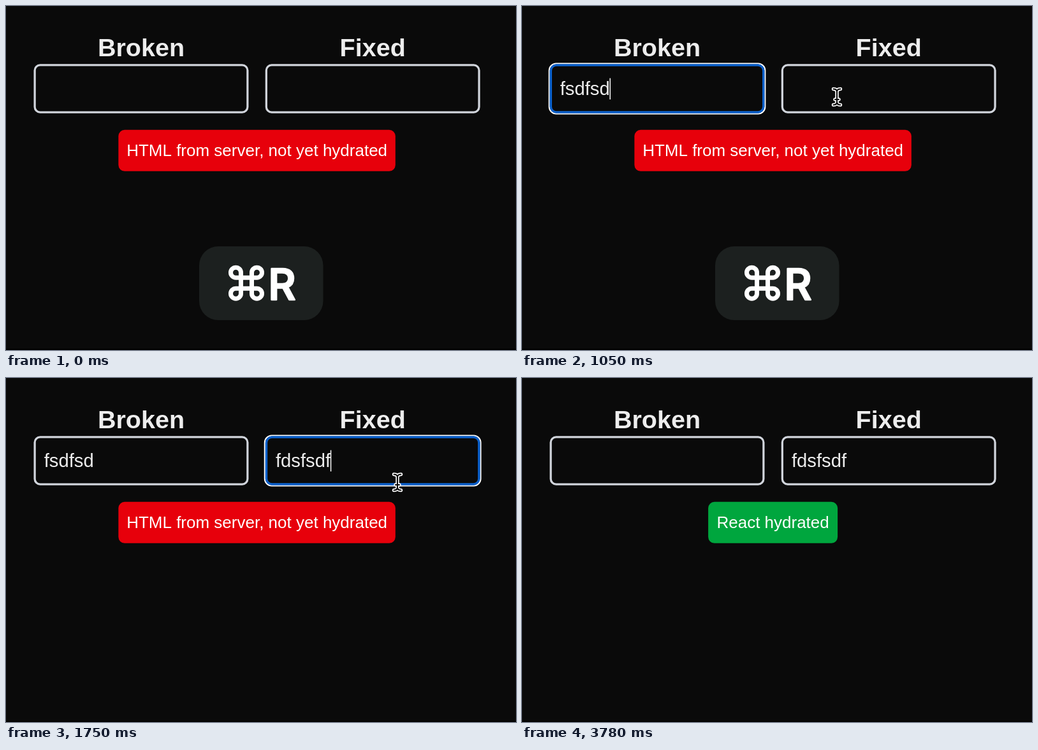
An HTML page with a canvas that plays this animation: 800x541 px, repeating every 3850 ms.

```html
<!DOCTYPE html>
<html lang="en">
<head>
<meta charset="utf-8">
<title>Hydration demo</title>
<style>
html, body { margin: 0; width: 100%; height: 100%; overflow: hidden; background: #0a0a0a; }
canvas { display: block; width: 800px; height: 541px; }
</style>
</head>
<body>
<canvas id="stage" width="800" height="541"></canvas>
<script>
const ctx = document.getElementById('stage').getContext('2d');
const LOOP = 3850, STEP = 70;
const SANS = '"Liberation Sans", Arial, sans-serif';
const HYDRATED = 1960;

// Pointer stops: time, x, y
const PATH = [
  [70, 4, 150], [420, 230, 90], [770, 232, 90], [1050, 494, 143],
  [1260, 497, 141], [1400, 500, 141], [1680, 614, 164],
  [2940, 614, 164], [3360, 604, 575]
];

const FIELDS = [
  { title: 'Broken', x: 43.5, text: 'fsdfsd', keys: [560, 630, 770, 840, 910, 980],
    focus: 350, blur: 1190, clear: HYDRATED },
  { title: 'Fixed', x: 406.7, text: 'fdsfsdf', keys: [1260, 1330, 1400, 1470, 1540, 1610, 1680],
    focus: 1190, blur: 2100, clear: LOOP }
];

const clamp = v => Math.max(0, Math.min(1, v));

function box(x, y, w, h, r) {
  ctx.beginPath();
  ctx.roundRect(x, y, w, h, r);
}

function frame(x, y, w, h, r, line, color) {
  const d = line / 2;
  box(x + d, y + d, w - line, h - line, r - d);
  ctx.lineWidth = line;
  ctx.strokeStyle = color;
  ctx.stroke();
}

function label(text, x, y, font, color, align = 'left') {
  ctx.font = font;
  ctx.textAlign = align;
  ctx.fillStyle = color;
  ctx.fillText(text, x, y);
}

function drawField(f, t) {
  const y = 91.3, w = 337, h = 77.4;
  const focused = t >= f.focus && t < f.blur;
  label(f.title, f.x + w / 2, 79, `bold 39.5px ${SANS}`, '#ededed', 'center');
  if (focused) {
    frame(f.x - 1.9, y - 1.9, w + 3.8, h + 3.8, 12, 2.1, '#fff');
    frame(f.x, y, w, h, 10.5, 3.5, '#0a60cc');
  } else {
    frame(f.x, y, w, h, 10, 3.25, '#d1d5dc');
  }
  const count = t < f.clear ? f.keys.filter(k => t >= k).length : 0;
  const typed = f.text.slice(0, count), left = f.x + 16.2;
  label(typed, left, 140, `29.25px ${SANS}`, '#ededed');
  if (focused) {
    ctx.fillStyle = '#ededed';
    ctx.fillRect(left + ctx.measureText(typed).width - 0.3, 113.5, 1.6, 33.5);
  }
}

function drawBadge(t) {
  const done = t >= HYDRATED;
  const w = done ? 203 : 434.5;
  box(393.6 - w / 2, 194.8, w, 65, 9.75);
  ctx.fillStyle = done ? '#00a63e' : '#e7000b';
  ctx.fill();
  label(done ? 'React hydrated' : 'HTML from server, not yet hydrated',
    393.6, 236.3, `26px ${SANS}`, '#fff', 'center');
}

function drawCommand(cx, cy) {
  const h = 8.5, r = 8;
  ctx.save();
  ctx.translate(cx, cy);
  ctx.beginPath();
  ctx.rect(-h, -h, 2 * h, 2 * h);
  for (const sx of [-1, 1]) for (const sy of [-1, 1]) {
    const x = sx * h, y = sy * h, ox = x + sx * r, oy = y + sy * r;
    ctx.moveTo(x, y);
    ctx.lineTo(x, oy);
    ctx.arc(ox, oy, r, sx < 0 ? 0 : Math.PI, -sy * Math.PI / 2, sx * sy > 0);
    ctx.lineTo(x, y);
  }
  ctx.lineWidth = 7;
  ctx.strokeStyle = '#fff';
  ctx.stroke();
  ctx.restore();
}

function drawShortcut(t) {
  const alpha = clamp((1330 - t) / 250);
  if (!alpha) return;
  ctx.save();
  ctx.globalAlpha = clamp((1260 - t) / 180);
  box(303, 378, 194.5, 116, 30);
  ctx.fillStyle = '#1c201f';
  ctx.fill();
  // Opaque grey instead of alpha keeps overlapping strokes even
  ctx.globalAlpha = 1;
  ctx.filter = `opacity(${alpha})`;
  ctx.globalAlpha = alpha;
  ctx.filter = 'none';
  drawCommand(377, 435.7);
  const grey = Math.round(10 + 245 * alpha);
  ctx.globalAlpha = 1;
  ctx.lineJoin = 'round';
  ctx.lineWidth = 2.6;
  ctx.strokeStyle = `rgb(${grey},${grey},${grey})`;
  ctx.font = '500 67px Inter, sans-serif';
  ctx.textAlign = 'left';
  const x = 416.3 + ctx.measureText('R').actualBoundingBoxLeft;
  label('R', x, 461.7, ctx.font, ctx.strokeStyle);
  ctx.strokeText('R', x, 461.7);
  ctx.restore();
}

function beam() {
  ctx.beginPath();
  for (const s of [-1, 1]) {
    ctx.moveTo(-5.5, 12.5 * s);
    ctx.quadraticCurveTo(-0.5, 12.5 * s, 0, 8.5 * s);
    ctx.quadraticCurveTo(0.5, 12.5 * s, 5.5, 12.5 * s);
  }
  ctx.moveTo(0, -9);
  ctx.lineTo(0, 9);
  ctx.moveTo(-3, 4);
  ctx.lineTo(3, 4);
  for (const [width, color] of [[5.4, '#fff'], [2.1, '#0a0a0a']]) {
    ctx.lineWidth = width;
    ctx.strokeStyle = color;
    ctx.stroke();
  }
}

function arrow() {
  ctx.beginPath();
  [[0, 0], [0, 23], [5.3, 18], [9, 26.5], [13, 24.7], [9.4, 16.5], [16.6, 16.5]]
    .forEach(p => ctx.lineTo(...p));
  ctx.closePath();
  ctx.lineWidth = 3.4;
  ctx.strokeStyle = '#fff';
  ctx.stroke();
  ctx.fillStyle = '#000';
  ctx.fill();
}

function drawPointer(t) {
  const i = PATH.findIndex(p => p[0] > t);
  if (i < 1) return;
  const [t0, x0, y0] = PATH[i - 1], [t1, x1, y1] = PATH[i];
  const p = (t - t0) / (t1 - t0), e = p * p * (3 - 2 * p);
  const x = x0 + (x1 - x0) * e, y = y0 + (y1 - y0) * e;
  const overField = y > 85 && y < 170 && FIELDS.some(f => x > f.x && x < f.x + 337);
  ctx.save();
  ctx.translate(x, y);
  ctx.lineCap = 'round';
  ctx.lineJoin = 'round';
  overField ? beam() : arrow();
  ctx.restore();
}

function draw(t) {
  ctx.fillStyle = '#0a0a0a';
  ctx.fillRect(0, 0, 800, 541);
  ctx.fillStyle = '#000';
  ctx.fillRect(0, 539, 800, 2);
  FIELDS.forEach(f => drawField(f, t));
  drawBadge(t);
  drawShortcut(t);
  drawPointer(t);
}

const start = performance.now();
function tick() {
  const t = (performance.now() - start) % LOOP;
  draw(Math.floor(t / STEP) * STEP);
  requestAnimationFrame(tick);
}
tick();
</script>
</body>
</html>
```
